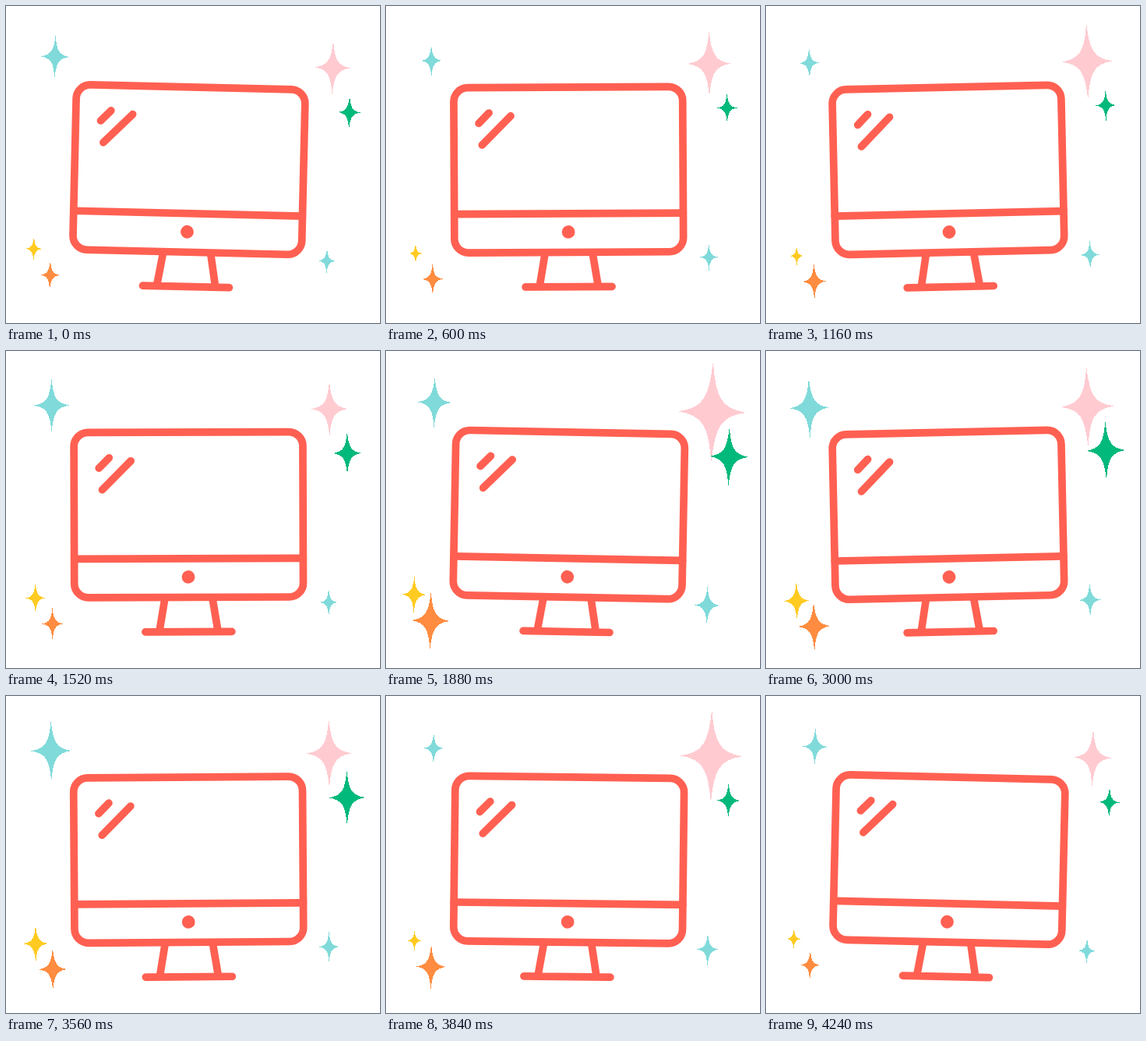
An HTML page without scripts that plays this animation: 480x406 px, repeating every 4280 ms.

```html
<!DOCTYPE html>
<html lang="en">
<head>
<meta charset="utf-8">
<title>Sparkling monitor</title>
<style>
/* Clock in milliseconds; every pose is a formula of it */
@property --t { syntax: "<number>"; inherits: true; initial-value: 0; }
@keyframes clock { from { --t: 0; } to { --t: 4280; } }

html, body { margin: 0; width: 100%; height: 100%; overflow: hidden; background: #fff; }
svg { display: block; width: 100%; height: 100%; animation: clock 4.28s linear infinite; }

.scene {
  transform-origin: 240px 232px;
  transform: rotate(calc(1.33deg * cos(360deg * var(--t) / 2094)));
}
.monitor { fill: none; stroke: #ff6052; stroke-width: 9.7; stroke-linecap: round; }
.monitor circle { fill: #ff6052; stroke: none; }

/* --peak: time of the first full size, --min: smallest scale */
.star {
  --min: .5;
  --wave: pow(.5 + .5 * cos(360deg * (var(--t) - var(--peak)) / 526), 1.2);
  transform: scale(calc(var(--min) + (1 - var(--min)) * var(--wave)));
  shape-rendering: crispEdges;
}
.pink { fill: #ffcbd1; --peak: 245; }
.aqua { fill: #80dada; --peak: 268; --min: .65; }
.orange { fill: #ff8c40; --peak: 275; }
.green { fill: #00b97b; --peak: 337; }
.yellow { fill: #ffcb22; --peak: 356; }
.teal { fill: #80dada; --peak: 394; }
</style>
</head>
<body>
<svg viewBox="0 0 480 406">
  <defs>
    <path id="star" d="M0-100C7-28 18-8 67 0C18 8 7 28 0 100C-7 28-18 8-67 0C-18-8-7-28 0-100Z"/>
  </defs>
  <g class="scene">
    <g class="monitor">
      <rect x="87.5" y="104" width="293.8" height="211.4" rx="18"/>
      <path d="M87.5 265.8H381.3"/>
      <path d="M119.5 149.7L132.6 136.4M123.6 177.5L160.5 140.5"/>
      <path d="M203.4 318L196.8 357M264.9 318L271.3 357M178.4 359.6H289.4"/>
      <circle cx="233.8" cy="289.4" r="8.4"/>
    </g>
    <g transform="translate(415.7 74.8) scale(.69)"><use class="star pink" href="#star"/></g>
    <g transform="translate(438.3 131.6) scale(.385)"><use class="star green" href="#star"/></g>
    <g transform="translate(59.1 69) scale(.385)"><use class="star teal" href="#star"/></g>
    <g transform="translate(37.5 315.7) scale(.25)"><use class="star yellow" href="#star"/></g>
    <g transform="translate(59.2 348.8) scale(.375)"><use class="star orange" href="#star"/></g>
    <g transform="translate(413.9 322.5) scale(.25)"><use class="star aqua" href="#star"/></g>
  </g>
</svg>
</body>
</html>
```
